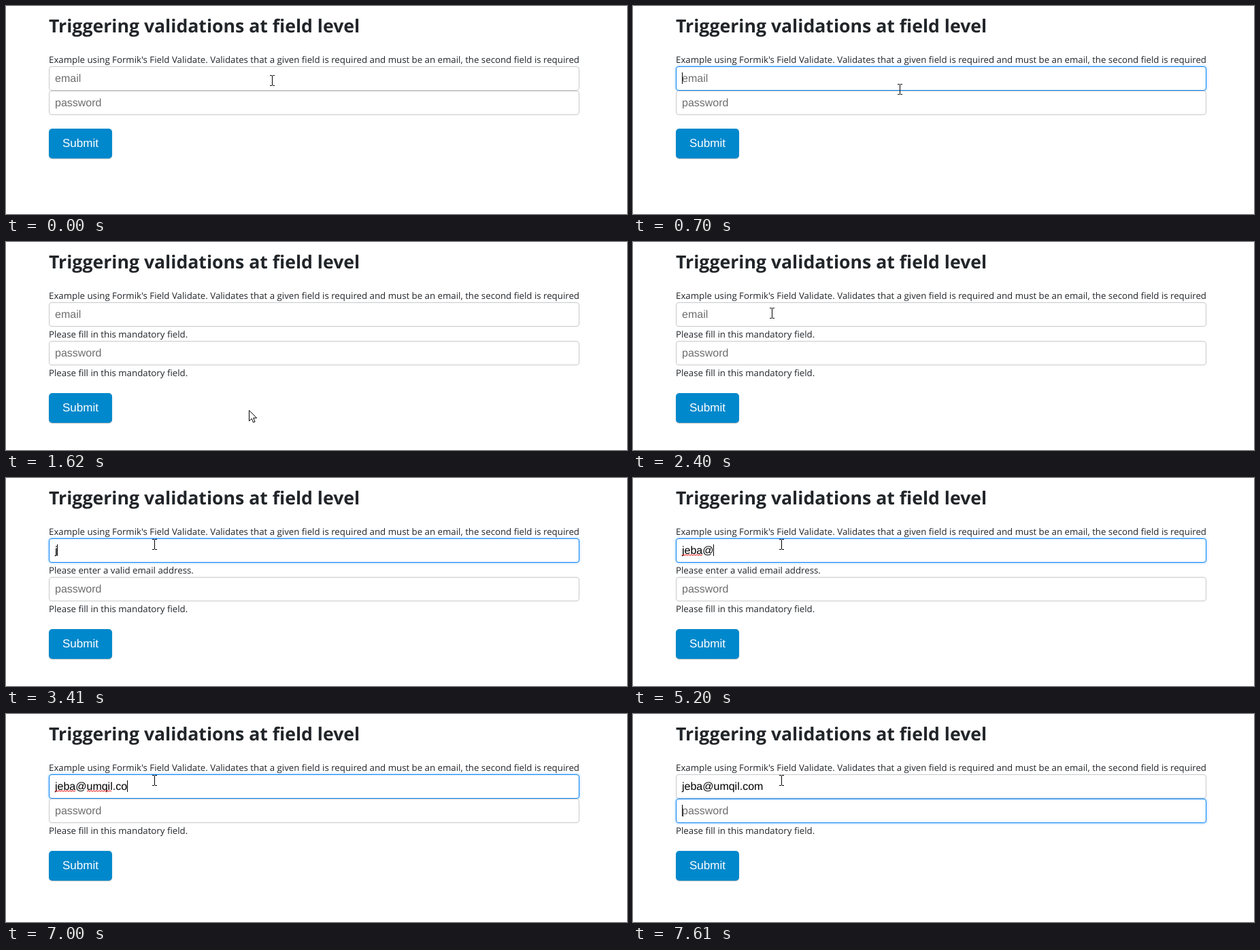
An HTML page for the animation above (8000 ms loop, 913 by 307 pixels).

```html
<!DOCTYPE html>
<html lang="en">
<head>
<meta charset="utf-8">
<title>Field level validation</title>
<style>
  html, body { margin: 0; width: 100%; height: 100%; overflow: hidden; background: #fff; }
  svg { display: block; width: 913px; height: 307px; }
  text { font-family: "Open Sans", "Noto Sans", sans-serif; font-size: 13.27px; fill: #212529;
         text-rendering: geometricPrecision; white-space: pre; }
  .title { font-size: 26.65px; font-weight: 700; }
  .input { font-family: "Liberation Sans", Arial, sans-serif; font-size: 16px; fill: #000; }
  .hint { fill: #6e6e6e; }
  .submit { font-family: "Liberation Sans", Arial, sans-serif; font-size: 17px; fill: #fff; }
  .box { fill: #fff; stroke: #c8c8c8; }
  .ring { fill: none; stroke: #0080ff; visibility: hidden; }
  .focus .box { stroke: #0a84f6; }
  .focus .ring { visibility: visible; }
  .squiggle { fill: none; stroke: #f00000; stroke-width: 1; }
</style>
</head>
<body>
<svg viewBox="0 0 913 307">
  <defs>
    <g id="ring">
      <rect x="63.5" y=".5" width="779" height="35" rx="4" stroke-width="7" stroke-opacity=".05"/>
      <rect x="63.5" y=".5" width="779" height="35" rx="4" stroke-width="5" stroke-opacity=".07"/>
      <rect x="63.5" y=".5" width="779" height="35" rx="4" stroke-width="3" stroke-opacity=".08"/>
    </g>
    <rect id="box" x="63.5" y=".5" width="779" height="35" rx="3.5"/>
  </defs>
  <text class="title" x="63" y="39">Triggering validations at field level</text>
  <text x="63" y="84">Example using Formik's Field Validate. Validates that a given field is required and must be an email, the second field is required</text>

  <g id="email" transform="translate(0 89)">
    <use class="ring" href="#ring"/>
    <use class="box" href="#box"/>
    <text class="input hint" x="72" y="23">email</text>
    <text class="input" id="typed" x="72" y="23"></text>
    <path class="squiggle" id="wave1"/>
    <path class="squiggle" id="wave2"/>
  </g>
  <g id="password">
    <use class="ring" href="#ring"/>
    <use class="box" href="#box"/>
    <text class="input hint" x="72" y="23">password</text>
  </g>
  <text id="emailError" x="63" y="141"></text>
  <text id="passwordError" x="63"></text>

  <g id="button">
    <rect x="62.5" y="1.5" width="94" height="44" rx="5.5" opacity=".07"/>
    <rect x="63" y="1" width="93" height="44" rx="5" opacity=".13"/>
    <rect x="63" width="93" height="44" rx="5" fill="#0088cc"/>
    <text class="submit" x="83" y="27">Submit</text>
  </g>

  <rect id="caret" width="1" height="17"/>
  <path id="beam" d="M-3 -8h3v1h1v-1h3v1h-3v14h3v1h-3v-1h-1v1h-3v-1h3v-14h-3z"/>
  <path id="arrow" d="M.5 .5V16.2L4.2 12.7 6.6 18.3 9.1 17.2 6.7 11.8H11.6Z" fill="#fff" stroke="#000"/>
</svg>
<script>
const LOOP = 8000;
const ADDRESS = 'jeba@umqil.com';
const REQUIRED = 'Please fill in this mandatory field.';
const INVALID = 'Please enter a valid email address.';
const $ = id => document.getElementById(id);

// Form changes: each step is merged over the ones before it.
const steps = [
  [0, { focus: '', chars: 0, caret: 0, waves: 0, emailError: '', passwordError: '' }],
  [470, { focus: 'email', caret: 1 }],
  [930, { focus: 'password' }],
  [1010, { emailError: REQUIRED }],
  [1620, { focus: '', caret: 0, passwordError: REQUIRED }],
  [2480, { focus: 'email', caret: 1 }],
  [3010, { caret: 0 }],
  [3410, { caret: 1, chars: 1, emailError: INVALID }],
  [3730, { chars: 2 }],
  [3960, { chars: 3 }],
  [4420, { chars: 4 }],
  [4880, { caret: 0 }],
  [5200, { caret: 1, chars: 5, waves: 1 }],
  [5730, { chars: 6 }],
  [5900, { chars: 7 }],
  [6050, { chars: 8 }],
  [6220, { chars: 9 }],
  [6450, { chars: 10 }],
  [6600, { chars: 11 }],
  [6690, { waves: 2 }],
  [6920, { chars: 12 }],
  [7000, { chars: 13, emailError: '' }],
  [7070, { chars: 14 }],
  [7530, { focus: 'password', waves: 0 }]
];

// Pointer: time, x, y; a fourth value of 1 shows the arrow.
const pointer = [
  [0, 391, 110], [70, 396, 109], [150, 400, 109],
  [630, 397, 114], [700, 392, 123], [780, 388, 132], [860, 385, 139],
  [1010, 385, 139, 1], [1160, 384, 142, 1], [1240, 380, 162], [1310, 374, 190, 1],
  [1390, 366, 218, 1], [1470, 360, 238, 1], [1540, 357, 248, 1],
  [1790, 350, 258, 1], [1860, 335, 264, 1], [1940, 308, 246, 1], [2020, 276, 206, 1],
  [2090, 249, 160], [2170, 228, 118], [2250, 212, 89], [2320, 206, 98],
  [2400, 204, 105], [2630, 218, 98]
];

const typed = $('typed');
const hint = $('email').querySelector('.hint');

function textWidth(text) {
  typed.textContent = text;
  return text ? typed.getComputedTextLength() : 0;
}

function wave(from, to) {
  let d = `M${from} 25.5`;
  for (let x = from + 2, up = true; x <= to; x += 2, up = !up) d += `L${x} ${up ? 23.8 : 25.5}`;
  return d;
}

function drawWaves() {
  const at = n => 72 + textWidth(ADDRESS.slice(0, n));
  $('wave1').setAttribute('d', wave(72, at(4)));
  $('wave2').setAttribute('d', wave(Math.round(at(5)), at(10)));
}

const show = (el, on) => el.setAttribute('visibility', on ? 'visible' : 'hidden');
const move = (el, x, y) => el.setAttribute('transform', `translate(${x} ${y})`);

function drawForm(s) {
  const passwordY = s.emailError ? 146 : 125;
  const width = textWidth(ADDRESS.slice(0, s.chars));
  show(hint, !s.chars);
  show($('wave1'), s.waves > 0);
  show($('wave2'), s.waves > 1);
  for (const id of ['email', 'password']) {
    $(id).classList.toggle('focus', s.focus === id);
    $(id + 'Error').textContent = s[id + 'Error'];
  }
  move($('password'), 0, passwordY);
  $('passwordError').setAttribute('y', passwordY + 52);
  move($('button'), 0, passwordY + (s.passwordError ? 77 : 56));
  show($('caret'), s.caret);
  if (s.focus === 'email') move($('caret'), Math.floor(72 + width), 98);
  else move($('caret'), 72, passwordY + 9);
}

function drawPointer([, x, y, isArrow]) {
  show($('arrow'), isArrow);
  show($('beam'), !isArrow);
  move(isArrow ? $('arrow') : $('beam'), x, y);
}

const start = performance.now();
function frame() {
  const t = Math.max(0, performance.now() - start) % LOOP;
  const past = list => list.filter(([at]) => at <= t);
  drawForm(Object.assign({}, ...past(steps).map(([, change]) => change)));
  drawPointer(past(pointer).pop());
  requestAnimationFrame(frame);
}

drawWaves();
frame();
</script>
</body>
</html>
```
